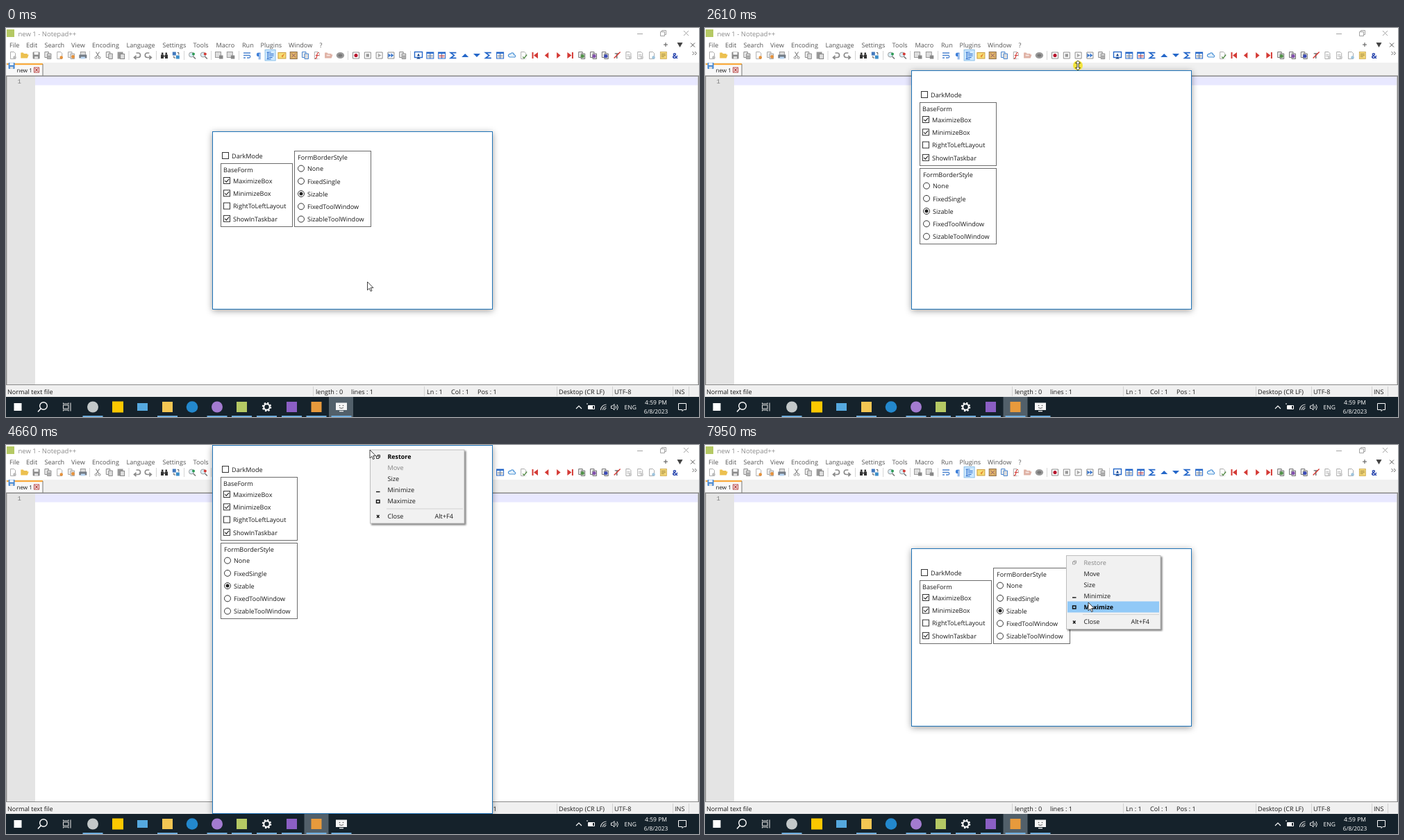
Animation, 998 px wide and 561 px high, one loop 8 s. Source, as an HTML page:

```html
<!DOCTYPE html>
<html lang="en">
<head>
<meta charset="utf-8">
<title>Form demo</title>
<style>
html, body { margin: 0; width: 100%; height: 100%; overflow: hidden; background: #fff; }
svg { display: block; width: 998px; height: 561px; }
text { font: 9.1px "Open Sans", "Noto Sans", sans-serif; fill: #1a1a1a; text-rendering: geometricPrecision; white-space: pre; }
.menubar text { fill: #555; }
.tray text { fill: #fff; }
.shadow { filter: drop-shadow(0 2px 5px rgba(0, 0, 0, .38)); }
.popup { filter: drop-shadow(2px 2px 1px rgba(0, 0, 0, .5)); }
</style>
</head>
<body>
<svg id="stage" viewBox="0 0 998 561" xmlns="http://www.w3.org/2000/svg"></svg>
<script>
const LOOP = 8000;
const BLUE = '#2467c9', RED = '#d43a35', GRAY = '#8b8b8b';

const rect = (x, y, w, h, fill, more = '') => `<rect x="${x}" y="${y}" width="${w}" height="${h}" fill="${fill}" ${more}/>`;
const disc = (x, y, r, fill, more = '') => `<circle cx="${x}" cy="${y}" r="${r}" fill="${fill}" ${more}/>`;
const fill = (d, color) => `<path d="${d}" fill="${color}"/>`;
const line = (d, color, w = 1, bg = 'none') => `<path d="${d}" fill="${bg}" stroke="${color}" stroke-width="${w}"/>`;
const at = (x, y, body, more = '') => `<g transform="translate(${x} ${y})" ${more}>${body}</g>`;
// Text is placed by its left edge and the middle of its capitals.
const text = (x, mid, s, more = '') => `<text x="${x}" y="${mid + 3.3}" ${more}>${s}</text>`;

/* Toolbar */
const page = (c = '#bbb') => line('M-3.5-5H1.5L3.5-3V5H-3.5Z', '#999', .8, '#fff') + disc(2.5, 3, 2.3, c);
const floppy = (c = GRAY) => rect(-5, -5, 10, 10, c, 'rx="1"') + rect(-3, -4.5, 6, 3.5, '#fff') + rect(-2.5, 1.5, 5, 3.5, '#ddd');
const sheets = c => line('M-4.5-5H1V3H-4.5Z', c, 1, '#eee') + line('M-1-2.5H4.5V5H-1Z', c, 1, '#ddd');
const folder = c => fill('M-5.5 4V-4H-2L-1-2.5H4V-1H6L4 4Z', c);
const grid = c => rect(-5.5, -5, 11, 10, BLUE) + rect(-4.5, -2.5, 4, 6.5, '#fff') + rect(.5, -2.5, 4, 6.5, '#fff') + line('M-4 0H4M-4 2.2H4', c, .9);
const sigma = line('M4-3.8H-4L1 0L-4 3.8H4', BLUE, 1.7);
const lens = c => line('M1.5 1.5L5 5', '#777', 1.6) + disc(-1, -1, 3.5, '#d8ecf5', 'stroke="#999"') + disc(2, -2, 2, c);
const symbol = (s, c) => `<text text-anchor="middle" y="4" style="font-size:11px;font-weight:700;fill:${c}">${s}</text>`;
const frame = (c, inner) => line('M-4.5-4.5H4.5V4.5H-4.5Z', GRAY, 1, '#fff') + inner;

const icons = {
  new: page(), open: folder('#ecc04f'), save: floppy(), all: sheets(GRAY) + rect(-1, 0, 5, 4, '#aaa'),
  close: page('#e6923c'), closeAll: sheets('#aaa') + disc(2.5, 2, 2.4, '#e6923c'),
  print: rect(-3.5, -5, 7, 5, '#ddd', 'stroke="#888" stroke-width=".8"') + rect(-5.5, -1, 11, 5, '#737b85') + rect(-3, 2, 6, 3, '#b9d6f3'),
  cut: line('M-2.5-5L2 2M2.5-5L-2 2', GRAY, 1.2) + disc(-2.5, 3.3, 1.5, '#fff', 'stroke="#888"') + disc(2.5, 3.3, 1.5, '#fff', 'stroke="#888"'),
  copy: sheets(GRAY), paste: rect(-5, -5, 8, 10, '#999') + rect(-1, -2, 6, 7, '#ddd', 'stroke="#888"'),
  undo: line('M-1-3.5H2C6-3.5 6 3 2 3H-4M-1 .3L-4 3L-1 5.5', GRAY, 1.7),
  redo: line('M1-3.5H-2C-6-3.5-6 3-2 3H4M1 .3L4 3L1 5.5', GRAY, 1.7),
  find: rect(-5, -1, 4, 5.5, '#333') + rect(1, -1, 4, 5.5, '#333') + rect(-4, -4, 2.5, 3, '#333') + rect(1.5, -4, 2.5, 3, '#333') + rect(-1, 0, 2, 2, '#555'),
  replace: rect(-5, -5, 5, 5, '#4279bd') + rect(0, 0, 5, 5, '#3c8ec9') + line('M-3 1V3.5H-1M2-4H4V-1', '#555'),
  zoomIn: lens('#2d9c55'), zoomOut: lens(RED),
  sync: rect(-5.5, -5, 8, 8, '#ddd', 'stroke="#999"') + rect(0, 0, 5.5, 5, '#888'),
  wrap: line('M-5-3.5H5M-5 0H4Q6 3 3 3.5H0M-5 3.5H-2', '#4a83cf', 1.3),
  pilcrow: symbol('¶', '#3f80d9'),
  indent: rect(-7.5, -8, 15, 15.5, '#cde8ff', 'stroke="#8abfe8"') + line('M-5-4.5H1M-2-2H5M-2 .5H5M-2 3H3M-5 5.2H1M-3.5-4V5', BLUE, 1.1),
  note: rect(-5.5, -4, 11, 8.5, '#f7dd75', 'stroke="#cb9c3f"') + fill('M-1 1L4-3L1 3Z', '#e2872d'),
  map: rect(-5, -5, 10, 10, '#dfb369', 'stroke="#8b6b45"') + line('M-3-3L3 3M-3 3L3-3', '#856', .9),
  docs: sheets('#4986d1'), fn: page('#fff') + line('M3-4Q0-4 0 0T-3 5M-2 0H3', RED, 1.2),
  work: folder('#dfb1a4') + rect(-3, -1, 5, 2, '#f5e4df'),
  eye: `<ellipse rx="5.7" ry="4.5" fill="#999"/><ellipse rx="3" ry="2" fill="#777"/>`,
  rec: frame('', disc(0, 0, 2.6, '#b6152d')), stop: frame('', rect(-2.2, -2.2, 4.4, 4.4, '#999')),
  play: frame('', fill('M-2-3L3 0L-2 3Z', '#aaa')), fast: frame('', fill('M-4-3L0 0L-4 3ZM0-3L4 0L0 3Z', '#3b76cb')),
  screen: rect(-5.5, -5, 11, 8, '#fff', `stroke="${BLUE}" stroke-width="1.4"`) + fill('M-2 1L0-3L2 1ZM-3 5L0 2L3 5Z', '#17458d'),
  grid: grid('#888'), gridRed: grid(RED), sigma,
  up: fill('M-5 2.5L0-2.5L5 2.5Z', BLUE), down: fill('M-5-2.5L0 2.5L5-2.5Z', BLUE),
  cloud: line('M-3 2.5C-7 1-4-3-2-2C0-5 4-3 3-1C7 0 5 3 3 2.5Z', '#4a91d6', 1.2, '#e3f0fb'),
  check: page('#fff') + line('M-1 2L1 4L5-1', '#558b48', 1.3),
  first: fill('M4-4.5L-2 0L4 4.5ZM-4.5-4.5H-2.5V4.5H-4.5Z', RED), prev: fill('M2.5-4.5L-3 0L2.5 4.5Z', RED),
  next: fill('M-2.5-4.5L3 0L-2.5 4.5Z', RED), last: fill('M-4-4.5L2 0L-4 4.5ZM2.5-4.5H4.5V4.5H2.5Z', RED),
  runA: sheets('#777') + disc(1, 1, 2.6, '#54934c'), runB: sheets('#777') + disc(1, 1, 2.6, '#8352ad'), runC: sheets('#777') + disc(1, 1, 2.6, '#3d4cb6'),
  strike: symbol('T', '#777') + line('M-4 4L5-5', RED, 1.4), grayPage: page('#ccc') + line('M-2-1H2M-2 1H2', '#bbb'),
  look: page('#9ec4dd'), memo: rect(-4.5, -5, 9, 10, '#f3d778', 'stroke="#c9a64c" stroke-width=".8"') + line('M-3-2H3M-3 0H3M-3 2H1', '#967b38', .8),
  amp: symbol('&amp;', '#2845ad')
};
const groups = [
  [10, 'new open save all close closeAll print'], [132, 'cut copy paste'], [188.5, 'undo redo'], [228, 'find replace'],
  [268, 'zoomIn zoomOut'], [307, 'sync sync'], [347, 'wrap pilcrow indent note map docs fn work eye'],
  [504, 'rec stop play fast all'],
  [594, 'screen grid gridRed sigma up down sigma grid cloud check first prev next last runA runB runC strike grayPage grayPage look memo amp']
];
const toolbar = groups.map(([x, names]) =>
  names.split(' ').map((n, i) => at(x + i * 16.8, 39.5, icons[n])).join('') +
  (x > 20 ? line(`M${x - 11.5} 33V46`, '#d5d5d5') : '')).join('');

/* Editor */
const menus = [[5, 'File'], [29, 'Edit'], [55.5, 'Search'], [94, 'View'], [124, 'Encoding'], [173.5, 'Language'], [225.5, 'Settings'],
  [269.5, 'Tools'], [302.5, 'Macro'], [340, 'Run'], [366.5, 'Plugins'], [407, 'Window'], [451.5, '?']];
const status = [[2, 'Normal text file'], [446, 'length : 0'], [497, 'lines : 1'], [606, 'Ln : 1'], [641, 'Col : 1'], [679, 'Pos : 1'],
  [796, 'Desktop (CR LF)'], [876, 'UTF-8'], [963, 'INS']];

const editor =
  rect(0, 0, 998, 561, '#fff') + rect(1, 2, 11, 11, '#b5c964') +
  text(17.5, 9, 'new 1 - Notepad++', 'style="font-size:9.5px;fill:#8c8c8c"') +
  line('M909 8.5H917M942.5 5.5H948.5V11.5H942.5ZM944.5 5V3.5H950.5V9.5H949M976 4L983 11M983 4L976 11', '#999', .9) +
  `<g class="menubar">${menus.map(([x, s]) => text(x, 24.3, s)).join('')}</g>` +
  line('M947 24H953M950 21V27M986 21.5L992 27.5M992 21.5L986 27.5', '#555') + fill('M966.5 21H974.5L970.5 28Z', '#444') +
  toolbar + line('M988.5 34L991 36.5L988.5 39M992 34L994.5 36.5L992 39', '#555', .9) +
  rect(0, 50, 998, 19, '#f0f0f0') + rect(1, 51, 52, 18, '#f8f8f8') + rect(1, 51, 52, 2.2, '#faaa3c') + line('M53 52V69', '#777') +
  at(9, 60.5, floppy('#4b8bd4'), 'style="scale:.9"') + text(15.5, 60.5, 'new 1', 'style="font-size:8.1px"') +
  rect(40.5, 57, 7, 7, '#fff', 'stroke="#b4403f"') + line('M42 58.5L46 62.5M46 58.5L42 62.5', '#b4403f', 1.2) +
  rect(0, 68.5, 998, 446.5, '#8a8a8a') + rect(1.5, 70, 995, 444, '#fff') + rect(2, 70, 40, 444, '#e4e4e4') + rect(42, 70, 954, 12.5, '#e8e8ff') +
  text(16.5, 77, '1', 'style="font-family:\'Liberation Mono\',monospace;fill:#808080"') +
  rect(0, 515, 998, 17, '#f0f0f0') +
  line([442, 602, 793, 873, 960, 983].map(x => `M${x + .5} 517V531`).join(''), '#d2d2d2') +
  status.map(([x, s]) => text(x, 524.8, s)).join('');

/* Taskbar */
const gear = disc(0, 0, 4.2, 'none', 'stroke="#fff" stroke-width="2"') + disc(0, 0, 5.8, 'none', 'stroke="#fff" stroke-width="2" stroke-dasharray="2.3 2.25"');
const block = (c, s = 15) => rect(-s / 2, -s / 2, s, s, c);
const apps = [
  [17, block('#fff', 11)],
  [53, disc(1, -1.5, 5.3, 'none', 'stroke="#fff" stroke-width="1.4"') + line('M-2.7 2.3L-7 7', '#fff', 1.5)],
  [88, line('M-5.5-2.5H2V2.5H-5.5ZM-5.5-6V-4.5H2V-6M-5.5 6V4.5H2V6M5-6V6', '#ddd', 1.1)],
  [125, disc(0, 0, 8, '#c3c8c9')], [161, block('#fcc800', 16)], [196.5, rect(-7.5, -5.5, 15, 11, '#55a9df')],
  [232.5, block('#f4c653')], [268, disc(0, 0, 8.3, '#2388cd')], [304, disc(0, 0, 8, '#a37bd0')],
  [339.5, block('#b5c964')], [375.5, gear], [411.5, block('#8b5fc4')], [447, block('#e79a3c')],
  [483, rect(-8, -6, 16, 10.5, '#f5f5f5') + rect(-3, 5.5, 6, 1.3, '#f5f5f5') + disc(-2.5, -2, .8, '#555') + disc(2.5, -2, .8, '#555') + line('M-3 1Q0 3 3 1', '#555', .9)]
];
const tray =
  line('M821 549L825 545L829 549', '#fff', 1.1) +
  line('M838.5 544.5H847.5V549.5H838.5ZM837 543V541', '#fff', 1) + rect(839, 545, 6, 4, '#fff') +
  line('M856.5 551A8 8 0 0 1 864.5 543M859.5 551A5 5 0 0 1 864.5 546M862 551A2.5 2.5 0 0 1 864.5 548.5', '#ddd', 1.1) +
  line('M871.5 545H873.5L876 542.5V551L873.5 548.5H871.5ZM878 545Q879.5 547 878 549M880 543Q882.7 547 880 551', '#fff', .9) +
  text(890.5, 546.5, 'ENG', 'style="font-size:8.5px"') +
  text(936, 539.5, '4:59 PM', 'text-anchor="middle" style="font-size:8.5px"') +
  text(936, 552.7, '6/8/2023', 'text-anchor="middle" style="font-size:8.3px"') +
  line('M968.5 541.5H979.5V550.5H976L974 552.5V550.5H968.5Z', '#fff', 1);
const taskbar =
  rect(0, 532, 998, 29, '#15222b') +
  rect(465, 532, 35, 29, '#52606a', 'id="hotRec"') + rect(429.5, 532, 35, 29, '#52606a', 'id="hotApp"') +
  apps.map(([x, body]) => at(x, 546.5, body)).join('') +
  [125, 232.5, 304, 339.5, 375.5, 411.5, 447, 483].map(x => rect(x - 14.5, 559.2, 29, 1.8, '#76b9ed')).join('') +
  `<g class="tray">${tray}</g>`;

/* Dialog, measured from its top edge */
const checkbox = (x, y, label, on) =>
  rect(x - 4.5, y - 4.5, 9, 9, '#fff', 'stroke="#333"') + (on ? line(`M${x - 2.8} ${y}l2 2.2l4-4.4`, '#222', 1.1) : '') + text(x + 9, y + .3, label);
const radio = (x, y, label, on) =>
  disc(x, y, 4.5, '#fff', 'stroke="#333"') + (on ? disc(x, y, 2.5, '#222') : '') + text(x + 9, y + .5, label);
const dialog =
  rect(297.5, .5, 403, 256, '#fff', 'id="body" class="shadow" stroke="#1f73b7"') +
  checkbox(316, 35, 'DarkMode') +
  rect(309.5, 46.5, 103, 91, 'none', 'id="base" stroke="#6b6b6b"') + text(313, 55.3, 'BaseForm') +
  ['MaximizeBox', 'MinimizeBox', 'RightToLeftLayout', 'ShowInTaskbar'].map((s, i) => checkbox(318, 71 + i * 18.3, s, i != 2)).join('') +
  `<g id="border">` + rect(415.5, 28.5, 110, 109, 'none', 'stroke="#6b6b6b"') + text(420, 37.2, 'FormBorderStyle') +
  ['None', 'FixedSingle', 'Sizable', 'FixedToolWindow', 'SizableToolWindow'].map((s, i) => radio(425, 53.6 + i * 18.25, s, i == 2)).join('') + '</g>';

/* System menu */
const items = ['Restore', 'Move', 'Size', 'Minimize', 'Maximize', 'Close'];
const rowMid = i => 10.5 + i * 16 + (i == 5 ? 5.5 : 0);
const popup = (id, x, y, bold, off) => {
  const style = i => i == off ? 'style="fill:#858585"' : i == bold ? 'style="font-weight:700;font-size:8.9px;fill:#000"' : '';
  return at(x, y, rect(.5, .5, 135.5, 106, '#f1f1f1', 'class="popup" stroke="#bdbdbd"') +
    rect(2, 0, 132, 16, '#91c9f7', 'class="row"') +
    line('M24 85.5H134', '#d3d3d3') +
    line('M9.5 9.5H13V13H9.5ZM11 9V8H14.5V11.5H13.5', off == 0 ? '#999' : '#222', .9) +
    line('M9 61H14.5', '#111', 1.4) + line('M9.5 73H14V77H9.5Z', '#111', 1.4) + line('M10 94.5L13.5 98.5M13.5 94.5L10 98.5', '#111', 1.4) +
    items.map((s, i) => text(25.5, rowMid(i), s, style(i))).join('') + text(93.5, rowMid(5), 'Alt+F4'), `id="${id}"`);
};

const cursor =
  disc(0, 0, 7, '#f3e43c', 'id="click"') +
  `<path id="arrow" d="M0 0V12L2.8 9.4L4.6 13.6L6.5 12.8L4.7 8.7H8.5Z" fill="#fff" stroke="#111" stroke-width=".8"/>` +
  `<path id="resize" d="M0-7L3.5-3.2H1.1V3.2H3.5L0 7L-3.5 3.2H-1.1V-3.2H-3.5Z" fill="#fff" stroke="#111" stroke-width=".8"/>`;

const stage = document.getElementById('stage');
stage.innerHTML = editor +
  rect(297.5, .5, 403, 531, 'rgba(205,214,222,.45)', 'id="preview" class="shadow" stroke="#aab4bc"') +
  `<g id="dialog">${dialog}</g>` + taskbar +
  popup('menuA', 524, 6.5, 0, 1) + popup('menuB', 520, 159, 4, 0) + `<g id="cursor">${cursor}</g>`;

/* Motion */
const el = {};
stage.querySelectorAll('[id]').forEach(n => el[n.id] = n);
const clamp = v => Math.max(0, Math.min(1, v));
const ramp = (t, a, b) => clamp((t - a) / (b - a));
const set = (n, a, v) => n.setAttribute(a, v);

// Linear track through [time, ...values].
const track = (keys, t) => {
  const i = keys.findIndex(k => k[0] > t);
  if (i < 0) return keys[keys.length - 1].slice(1);
  if (i == 0) return keys[0].slice(1);
  const a = keys[i - 1], b = keys[i], k = ramp(t, a[0], b[0]);
  return a.slice(1).map((v, j) => v + (b[j + 1] - v) * k);
};
const pointer = [[329, 520.5, 366], [560, 532, 312], [800, 535, 232], [1120, 527, 161], [1330, 526.5, 155], [1750, 526.5, 155], [1935, 529, 149],
  [2143, 529, 149], [2607, 537, 54], [2960, 530, 2], [3450, 528, 2], [3850, 528, 2], [4080, 524, 7], [4800, 524, 7], [5110, 536, 18],
  [5540, 536, 18], [5830, 536, 27], [5891, 536, 27], [6290, 522, 119], [6340, 522, 119], [6760, 520, 159], [7400, 520, 159], [7890, 552, 227]];
const edges = [[2143, 149, 405], [2607, 61, 405], [2960, 2, 405], [3519, 2, 405], [3520, 0, 531], [5650, 0, 531], [5720, 75, 467], [5840, 149, 405]];

function showMenu(menu, x, y, opacity, cx, cy) {
  menu.style.opacity = opacity;
  const row = Math.floor((cy - y - 2.5) / 16), hit = cx - x > 2 && row >= 0 && row < 5;
  const bar = menu.querySelector('.row');
  set(bar, 'y', rowMid(row) - 8);
  bar.style.opacity = hit ? 1 : 0;
}

function draw(t) {
  const q = Math.floor((t + 6) / 67) * 67 - 6;
  const [cx, cy] = track(pointer, q);
  const [top, bottom] = track(edges, t < 3500 ? q : t).map(Math.round);
  const tall = bottom - top > 262;

  set(el.dialog, 'transform', `translate(0 ${top})`);
  set(el.body, 'height', bottom - top);
  set(el.base, 'width', tall ? 110 : 103);
  set(el.border, 'transform', tall ? 'translate(-106 113)' : '');
  el.preview.style.opacity = t < 3520 ? ramp(t, 2980, 3190) : 0;

  el.hotRec.style.opacity = t < 70 ? 1 : t < 130 ? .5 : 0;
  el.hotApp.style.opacity = t < 70 ? 0 : t < 130 ? .5 : 1;

  showMenu(el.menuA, 524, 6.5, ramp(t, 4450, 4620) * (1 - ramp(t, 5580, 5720)), cx, cy);
  showMenu(el.menuB, 520, 159, ramp(t, 7050, 7220), cx, cy);

  const sizing = t >= 1870 && t < 3920;
  const dragging = t >= 2210 && t < 3520;
  const clicked = [4390, 5540, 6990].some(s => t >= s && t < s + 200);
  set(el.cursor, 'transform', `translate(${cx} ${cy})`);
  el.arrow.style.display = sizing ? 'none' : '';
  el.resize.style.display = sizing ? '' : 'none';
  el.click.style.display = dragging || clicked ? '' : 'none';
  set(el.click, 'r', dragging ? 7 : 9);
}

const start = performance.now();
function tick() {
  draw((performance.now() - start) % LOOP);
  requestAnimationFrame(tick);
}
tick();
</script>
</body>
</html>
```
